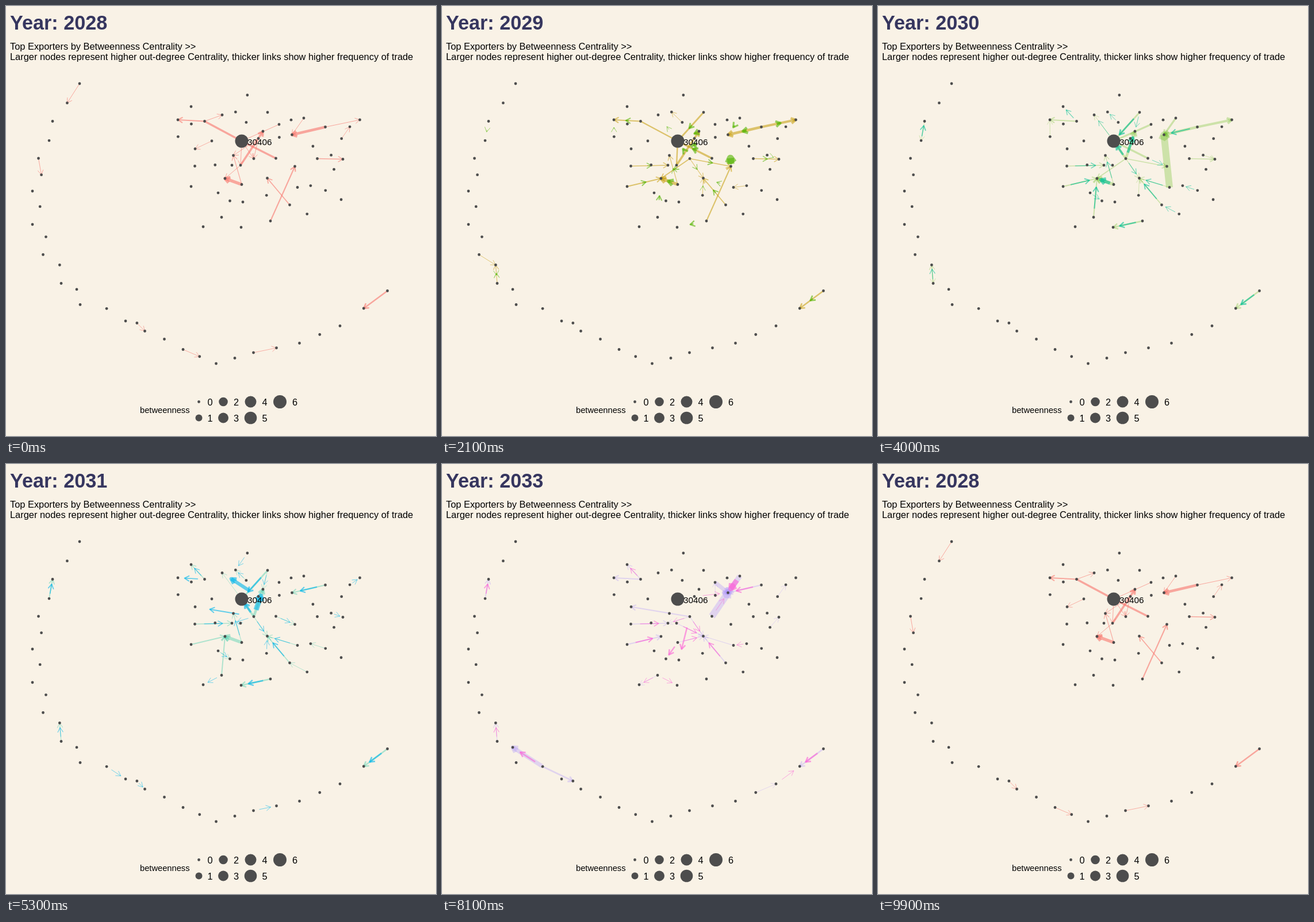
Animation, 748 px wide and 748 px high, one loop 10 s. Source, as an HTML page with a canvas:

```html
<!DOCTYPE html>
<html lang="en">
<head>
<meta charset="utf-8">
<title>Trade network</title>
<style>
html, body { margin: 0; height: 100%; overflow: hidden; background: #f9f2e6; }
canvas { display: block; }
</style>
</head>
<body>
<canvas id="stage" width="748" height="748"></canvas>
<script>
const ctx = document.getElementById('stage').getContext('2d');
const FONT = '"Liberation Sans", Arial, sans-serif';
const DOT = '#4d4d4d';

let seed = 11;
const random = () => (seed = (seed * 16807) % 2147483647) / 2147483647;
const distance = (p, q) => Math.hypot(p[0] - q[0], p[1] - q[1]);

// Traders that carry the main links.
const nodes = {
  a: [299,198], b: [345.5,200.5], c: [322,175], d: [376,189.5], e: [329,248.5],
  f: [328.5,278.5], g: [393,277], h: [322,314], i: [381,300], j: [410,310.5],
  k: [375,367.5], l: [395.5,260], m: [408,277], n: [389.5,339], o: [431,265.5],
  p: [469.5,265], q: [447,218], r: [439,230.5], s: [455,185], t: [475,206],
  u: [497.5,224], v: [518,195], w: [555.5,210.5], x: [615.5,198], y: [502.5,279],
  z: [507,315.5], A: [454.5,299.5], B: [493.5,346], C: [460,374], D: [409,385],
  E: [343,384], F: [412,341], G: [541.5,265.5], I: [586,266.5], H: [410,235]
};

// Outer arc: key points give the even dots; odd ones lie between, pulled inwards on the left.
const arc = [
  [128,135], [81,200.5], [56.5,265], [46,322], [46,380], [64.5,432.5], [96,482.5], [129,519.5],
  [208,548], [241.5,565.5], [308,597.5], [365.5,622], [430.5,603], [510.5,586.5], [581,556.5], [663.5,495.5]
];
const arcLength = arc.length * 2 - 1;
for (let i = 0; i < arcLength; i++) {
  const p = arc[i >> 1], q = arc[(i + 1) >> 1];
  const pull = i % 2 * 0.045 * Math.max(0, Math.sin(Math.PI * i / 20));
  nodes[i] = [375, 300].map((c, k) => c + ((p[k] + q[k]) / 2 - c) * (1 - pull));
}

// Smaller traders are scattered through the cluster, clear of the others.
const small = [];
while (small.length < 20) {
  const angle = random() * 2 * Math.PI, reach = Math.sqrt(random());
  const p = [450 + 165 * reach * Math.cos(angle), 265 + 125 * reach * Math.sin(angle)];
  if (Object.values(nodes).every(q => distance(p, q) > 21)) {
    nodes['dot' + small.length] = p;
    small.push(p);
  }
}
const dots = Object.values(nodes);

const years = ['#f8766d', '#c49a00', '#53b400', '#00c094', '#00b6eb', '#a58aff', '#fb61d7']
  .map(color => ({ color, edges: [] }));

function link(year, a, b, width) {
  years[year].edges.push({ a, b, width });
}

// Main links with the first and last year they run, counted from 2028.
function trade(first, last, width, pairs) {
  for (const pair of pairs.split(' ')) {
    const [a, b] = pair.split('>').map(name => nodes[name]);
    for (let year = first; year <= last; year++) link(year, a, b, width);
  }
}
trade(0, 6, 2.6, '30>29');
trade(0, 6, 1.7, 'B>A');
trade(0, 4, 1.1, 'j>l');
trade(0, 3, 5.5, 'j>i');
trade(0, 2, 4.5, 'w>u');
trade(0, 2, 3.6, 'p>H');
trade(0, 2, 2, 'b>a');
trade(0, 2, 1.3, 'G>I');
trade(0, 1, 3.6, 'm>q');
trade(0, 1, 2.1, 'C>y');
trade(0, 0, 3.6, 'b>H');
trade(0, 0, 1, 'w>x v>u b>d r>o H>o H>m m>i r>l t>H 0>1 4>5');
trade(1, 6, 1.1, '12>11 o>A');
trade(1, 6, 1.4, 'f>g');
trade(1, 4, 2.8, 's>H');
trade(1, 2, 4, 'w>x');
trade(1, 3, 1.8, 'h>i');
trade(1, 2, 1.7, 'o>y o>i');
trade(1, 1, 2.4, 'm>H b>H');
trade(2, 5, 1.2, 'z>A');
trade(2, 4, 3.6, 'o>H');
trade(2, 4, 2.4, 'C>D');
trade(2, 3, 4.5, 'o>q');
trade(2, 3, 2, 'k>i');
trade(2, 3, 0.9, 'H>d');
trade(2, 2, 12, 'z>u');
trade(2, 2, 3.2, 't>H v>u');
trade(3, 6, 1.7, '3>2');
trade(3, 6, 2.1, 'w>u');
trade(3, 6, 1.2, 'b>c');
trade(3, 4, 0.9, 's>q p>y');
trade(4, 4, 9, 'o>q');
trade(4, 4, 6, 'r>d');
trade(4, 5, 2, 'o>e b>a');
trade(4, 6, 0.9, 'k>E o>g');
trade(5, 5, 12, 'p>u');
trade(5, 5, 7, 't>u 15>13');
trade(5, 5, 2.8, '15>17');
trade(5, 6, 9, 'v>u');
trade(5, 6, 2, 'h>i');
trade(5, 6, 1.2, 'm>A j>A');
trade(6, 6, 2.5, 'o>F j>n 15>13');
trade(6, 6, 0.9, 'r>u p>u k>D');

// Minor links: towards the busy buyer, between near neighbours and along the arc.
const buyer = nodes.A;
years.forEach((_, year) => {
  for (const p of small) {
    const chance = random();
    if (distance(p, buyer) < 62) {
      if (chance < 0.6) link(year, p, buyer, 0.9);
    } else if (chance < 0.12) {
      const near = dots.filter(q => q !== p).sort((q, s) => distance(p, q) - distance(p, s))[0];
      link(year, p, near, 0.9);
    }
  }
  for (let i = 1; i < arcLength - 2; i++)
    if (random() < 0.06) link(year, nodes[i], nodes[i + 1], 0.9);
});

const FRAME = 100, FRAMES = 100;
const starts = [6, 21, 36, 50, 64, 78, 92];
const stepsOf = year => year < 3 ? 9 : 8;

function polyline(...points) {
  ctx.beginPath();
  points.forEach(([x, y]) => ctx.lineTo(x, y));
  ctx.stroke();
}

// Grows around the midpoint; the open arrow head keeps its size.
function drawEdge({ a, b, width }, grow) {
  const mx = (a[0] + b[0]) / 2, my = (a[1] + b[1]) / 2;
  const dx = (b[0] - a[0]) / 2 * grow, dy = (b[1] - a[1]) / 2 * grow;
  const tip = [mx + dx, my + dy];
  const angle = Math.atan2(dy, dx);
  const wing = turn => [tip[0] - 9.5 * Math.cos(angle + turn), tip[1] - 9.5 * Math.sin(angle + turn)];
  ctx.lineWidth = width;
  polyline([mx - dx, my - dy], tip);
  polyline(wing(Math.PI / 6), tip, wing(-Math.PI / 6));
}

function drawYear({ color, edges }, grow, fade) {
  ctx.strokeStyle = color;
  ctx.globalAlpha = 0.6 * fade;
  edges.forEach(edge => drawEdge(edge, grow));
  ctx.globalAlpha = 1;
}

function dot(x, y, r) {
  ctx.fillStyle = DOT;
  ctx.beginPath();
  ctx.arc(x, y, r, 0, 7);
  ctx.fill();
}

function text(str, x, y, size, color = '#000', weight = '') {
  ctx.font = `${weight} ${size}px ${FONT}`;
  ctx.fillStyle = color;
  ctx.fillText(str, x, y);
}

function drawLegend() {
  text('betweenness', 233, 708, 14.7);
  [2.4, 6, 7.8, 9, 10, 10.8, 11.5].forEach((r, i) => {
    const column = i >> 1, y = i % 2 ? 716.5 : 688.5;
    dot([335.5, 378, 425.5, 476.5][column], y, r);
    text(i, [350.5, 396, 445.5, 498][column], y + 6, 16.3);
  });
}

function draw(frame) {
  const from = Math.max(0, starts.filter(s => s <= frame).length - 1);
  const to = (from + 1) % years.length;
  const steps = stepsOf(from);
  const step = Math.min(Math.max(frame - starts[from] + 1, 0), steps);
  const p = step / steps;
  const shown = step > Math.ceil(steps / 2) ? to : from;

  ctx.fillStyle = '#f9f2e6';
  ctx.fillRect(0, 0, 748, 748);
  ctx.lineJoin = 'round';
  if (p < 1) drawYear(years[from], 1, 1 - p);
  if (p > 0) drawYear(years[to], p, 1);

  dots.forEach(([x, y]) => dot(x, y, 2.4));
  dot(...nodes.H, 11.5);
  text('30406', 420, 241.5, 15.3);
  text('Year: ' + (2028 + shown), 7, 41, 34.2, '#36365f', 'bold');
  text('Top Exporters by Betweenness Centrality >>', 7, 76, 16.4);
  text('Larger nodes represent higher out-degree Centrality, thicker links show higher frequency of trade', 7, 94, 16.4);
  drawLegend();
}

const begin = performance.now();
function tick() {
  draw(Math.floor((performance.now() - begin) / FRAME) % FRAMES);
  requestAnimationFrame(tick);
}
tick();
</script>
</body>
</html>
```
